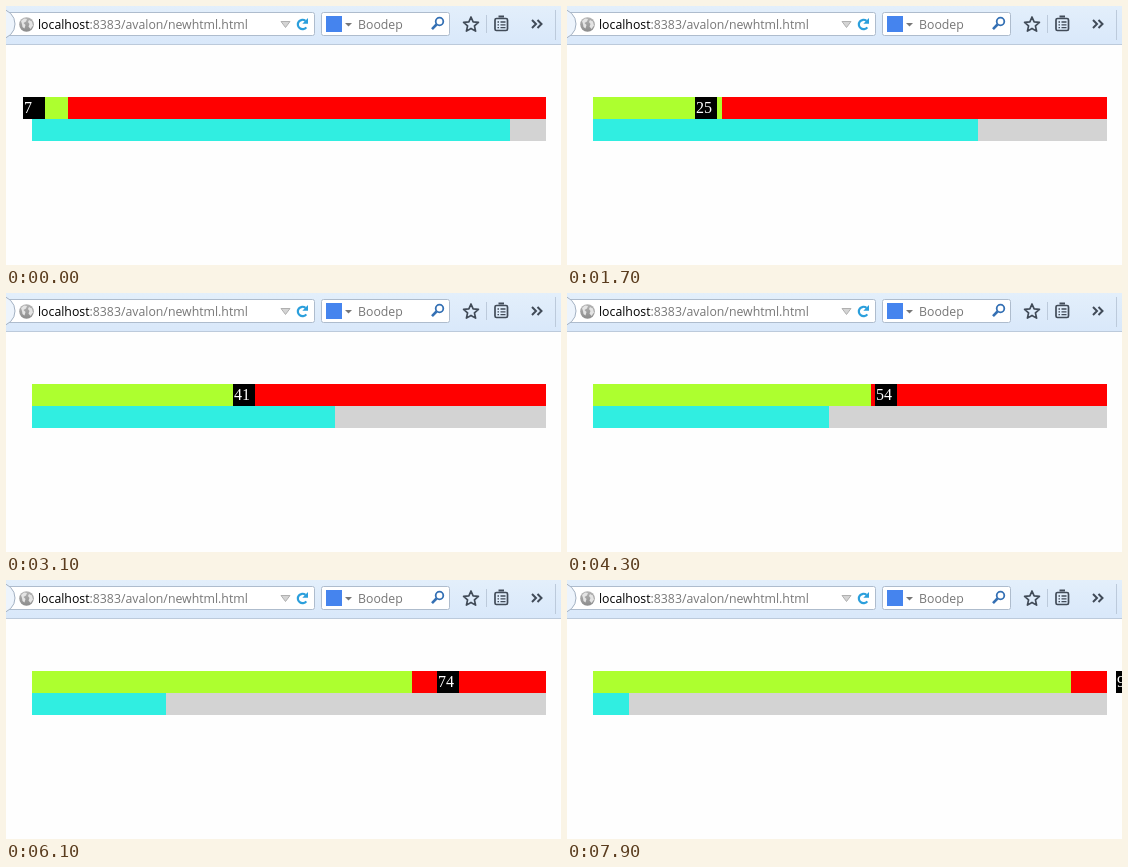
An HTML page that plays this animation: 555 px wide and 259 px high, repeating every 8 s.

```html
<!DOCTYPE html>
<html lang="en">
<head>
<meta charset="utf-8">
<title>Progress bars</title>
<style>
  html, body { margin: 0; width: 100%; height: 100%; overflow: hidden; background: #fefefe; }
  svg { display: block; }
  .ui { font: 12.3px "Open Sans", "Noto Sans", sans-serif; }
  .count { font: 16px "Liberation Serif", "Noto Serif", serif; }
  .crisp { shape-rendering: crispEdges; }
</style>
</head>
<body>
<svg width="555" height="259" viewBox="0 0 555 259">
  <defs>
    <linearGradient id="chrome" x2="0" y2="1">
      <stop offset="0" stop-color="#e3effb"/>
      <stop offset="1" stop-color="#d9e8fa"/>
    </linearGradient>
    <linearGradient id="globe" x2="0" y2="1">
      <stop offset="0" stop-color="#b4b4b4"/>
      <stop offset="1" stop-color="#8c8c8c"/>
    </linearGradient>
  </defs>

  <rect width="555" height="38" fill="url(#chrome)"/>
  <rect class="crisp" y="38" width="555" height="1" fill="#bccadb"/>

  <!-- address bar -->
  <rect x="-9.5" y="6.5" width="318" height="23" rx="2" fill="#fff" stroke="#aebccd"/>
  <circle cx="-6" cy="18" r="15" fill="#edf4fc" stroke="#a3b1c2"/>
  <circle cx="20.5" cy="18.5" r="7.3" fill="url(#globe)"/>
  <path d="M15 15l3-2.5 3 .5-1 2.5-2.500 1.500 2 2-1 3.500-2-1.500-.5-3zM23 14l3 1.500 1 4-2.500 3.500-2-2.500 1-2.500-1.500-2z" fill="#e4e4e4"/>
  <text class="ui" x="32" y="23" fill="#777">
    <tspan fill="#000">localhost</tspan><tspan>:8383/avalon/newhtml.html</tspan>
  </text>
  <path d="M275 15.500h9l-4.500 6z" fill="#d4d4d4" stroke="#b0b0b0"/>
  <g id="reload" fill="none" stroke-width="2.200">
    <path d="M300.300 21.300A4.700 4.700 0 1 1 299.500 14.800"/>
    <path d="M302 12v5.700h-5.700z" stroke="none"/>
  </g>

  <!-- search box -->
  <rect x="315.500" y="6.500" width="128" height="23" rx="2" fill="#fff" stroke="#aebccd"/>
  <rect x="320" y="10" width="16" height="16" fill="#4584ee"/>
  <path d="M339 17h7l-3.500 3.500z" fill="#777"/>
  <text class="ui" x="352" y="23" fill="#777" font-style="italic">Boodep</text>
  <g fill="none" stroke="#3470b4">
    <circle cx="433.500" cy="15.500" r="3.800" stroke-width="1.800"/>
    <path d="M430.500 18.500l-4.500 4.700" stroke-width="2.600"/>
  </g>

  <!-- toolbar buttons -->
  <g fill="none" stroke="#414b58" stroke-width="1.700">
    <path id="star" stroke-linejoin="round"/>
    <rect x="489" y="12.500" width="12.500" height="12" rx="1.500"/>
    <path d="M492.500 10.500h5.500" stroke-width="2"/>
    <path d="M491.500 16h1.500m1.500 0h5m-8 2.800h1.500m1.500 0h5m-8 2.800h1.500m1.500 0h5" stroke-width="1.300"/>
    <path d="M526 14l4 4-4 4m5.500-8l4 4-4 4" stroke-width="2"/>
  </g>
  <path class="crisp" d="M480.500 9v18M549.500 4v30" stroke="#bccadb"/>

  <!-- progress bars -->
  <g class="crisp">
    <rect x="26" y="91" width="514" height="22" fill="#f00"/>
    <rect id="done" x="26" y="91" height="22" fill="#adff2f"/>
    <rect x="26" y="113" width="514" height="22" fill="#d3d3d3"/>
    <rect id="left" x="26" y="113" height="22" fill="#30eee1"/>
  </g>
  <g id="label">
    <rect class="crisp" y="91" width="22" height="22" fill="#000"/>
    <text id="count" class="count" x="1" y="107" fill="#fff"></text>
  </g>
</svg>
<script>
  const LOOP = 8000, TICK = 100, BAR = 514;
  const $ = id => document.getElementById(id);

  const starPoints = Array.from({ length: 10 }, (_, i) => {
    const r = i % 2 ? 3.6 : 7.8, a = (i / 5 - 0.5) * Math.PI;
    return `${465 + r * Math.cos(a)},${18.8 + r * Math.sin(a)}`;
  });
  $("star").setAttribute("d", `M${starPoints.join("L")}Z`);

  // One percent per tick, plus a catch-up step about every ten ticks.
  const percentAt = tick => 7 + tick + Math.floor((tick + 2.7) / 10.3);

  function render(time) {
    const tick = Math.floor((time % LOOP) / TICK);
    const percent = percentAt(tick);
    const done = Math.round(BAR * percent / 100);
    const labelX = Math.round(17 + 6.186 * (percent - 7));
    const reloadColor = tick >= 47 && tick < 53 ? "#a3a7ab" : "#2b9fdc";

    $("done").setAttribute("width", done);
    $("left").setAttribute("width", BAR - done);
    $("label").setAttribute("transform", `translate(${labelX} 0)`);
    $("count").textContent = percent;
    $("reload").setAttribute("stroke", reloadColor);
    $("reload").setAttribute("fill", "none");
    $("reload").lastElementChild.setAttribute("fill", reloadColor);
  }

  const start = performance.now();
  function frame() {
    render(performance.now() - start);
    requestAnimationFrame(frame);
  }
  frame();
</script>
</body>
</html>
```
